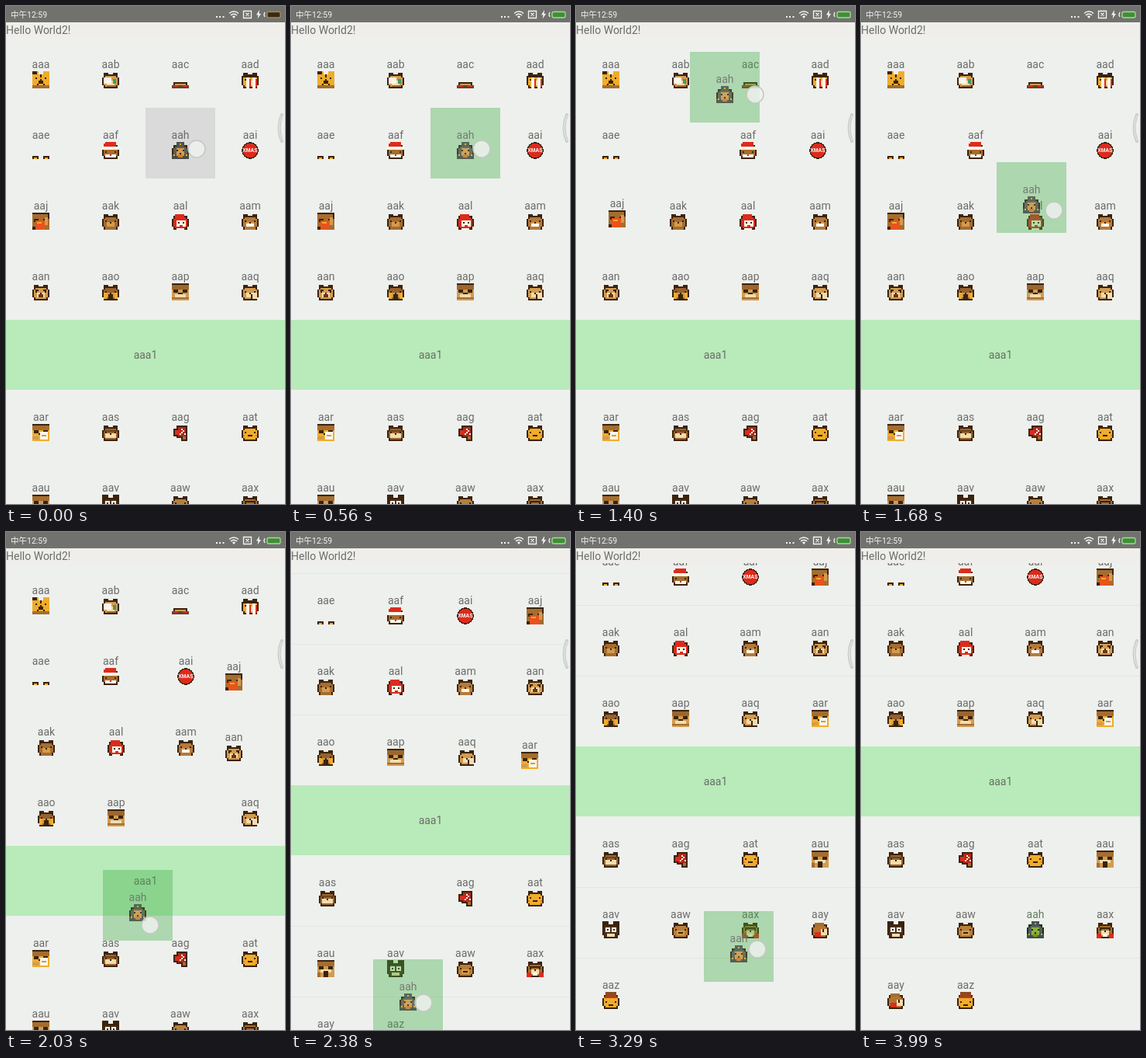
Write an HTML page that moves like this. It is 360 px wide and 641 px high and loops after 4060 ms.

```html
<!DOCTYPE html>
<html lang="en">
<head>
<meta charset="utf-8">
<title>Drag to reorder</title>
<style>
html, body { margin: 0; width: 100%; height: 100%; overflow: hidden; background: #eef0ee; }
svg { display: block; width: 100vw; height: 100vh; }
text { font: 14px Roboto, "Noto Sans", sans-serif; fill: #6c6d6a; }
.mid { text-anchor: middle; }
.clock { font: 10.5px Roboto, "Noto Sans CJK SC", sans-serif; fill: #f4f4f2; }
.xmas { font: bold 3.4px "Liberation Sans", sans-serif; fill: #fff; text-anchor: middle; }
.px { shape-rendering: crispEdges; }
.dropped text { fill: #5f7d5c; }
.dropped .px { filter: hue-rotate(45deg); }
</style>
</head>
<body>
<svg id="stage" viewBox="0 0 360 641" preserveAspectRatio="none">
  <defs>
    <clipPath id="list"><rect y="40" width="360" height="601"/></clipPath>
    <clipPath id="tile"><rect width="11" height="11"/></clipPath>
  </defs>
  <rect width="360" height="641" fill="#eef0ee"/>
  <g clip-path="url(#list)">
    <g id="page">
      <g id="lines" fill="#e3e6e3"></g>
      <rect y="404" width="360" height="90" fill="#b8ebb9"/>
      <text class="mid" x="180" y="454">aaa1</text>
      <rect id="press" x="180" y="131" width="90" height="91" fill="#000" opacity=".09"/>
      <g id="cells"></g>
    </g>
  </g>
  <rect y="21" width="360" height="19" fill="#efeeea"/>
  <text x="0" y="36">Hello World2!</text>
  <rect width="360" height="21" fill="#71716e"/>
  <text class="clock" x="6" y="15">中午12:59</text>
  <g fill="#f4f4f2">
    <path d="M271 13h2v2h-2zM275 13h2v2h-2zM279.500 13h2v2h-2zM292 13.500l2 2.500 2-2.500a3 3 0 0 0-4 0z"/>
    <path d="M327 5l-4 6.500h2.500l-1 5 4.500-6.500h-2.500z"/>
  </g>
  <g fill="none" stroke="#f4f4f2" stroke-width="1.300">
    <path d="M288 9.500a8.500 8.500 0 0 1 12 0M290 12a5.500 5.500 0 0 1 8 0"/>
    <path d="M306.500 6.500h10v9h-10zM309.500 9l4 4M313.500 9l-4 4"/>
    <path d="M334 8q-2 3 0 6"/>
  </g>
  <rect id="battery" x="337" y="7.500" width="17" height="7.500" rx="2" stroke-width="1.300"/>
  <path d="M356 140q-7 17 0 34" fill="none" stroke="#c6cac6" stroke-width="4" stroke-linecap="round"/>
  <path d="M356 141q-7 16 0 32" fill="none" stroke="#dce0dc" stroke-width="2" stroke-linecap="round"/>
  <g id="drag">
    <rect width="90" height="91" fill="#3caa42" opacity=".36"/>
    <g id="held" opacity=".85"></g>
  </g>
  <circle id="finger" r="11" fill="#f0f2ef" fill-opacity=".82" stroke="#c2c8c2" stroke-width="1.500"/>
</svg>
<script>
const LOOP = 4060, STEP = 70, PICK = 490, DROP = 3710, HELD = 'aah';
const $ = id => document.getElementById(id);
const DARK = '#3b230c', FUR = '#a56d2f', TAN = '#d29b50', CREAM = '#f1dcae',
  RED = '#dc2b1c', GOLD = '#f0ac2b', WHITE = '#fbf6ea';

// Pixel icons on an 11 x 11 grid.
const box = (x, y, w, h, c) => `<rect x="${x}" y="${y}" width="${w}" height="${h}" fill="${c}"/>`;
const dots = (c, ...at) => at.map(([x, y]) => box(x, y, 1, 1, c)).join('');
const eyes = (y = 5) => dots(DARK, [2, y], [8, y]);
const blob = c => box(1, 2, 9, 9, DARK) + box(0, 4, 11, 5, DARK) + box(2, 3, 7, 7, c) + box(1, 4, 9, 5, c);
const ears = c => box(1, 1, 3, 2, DARK) + box(7, 1, 3, 2, DARK) + dots(c, [2, 2], [8, 2]);
const bear = (c = FUR, m = CREAM) => ears(c) + blob(c) + box(3, 6, 5, 3, m) + eyes() + box(5, 6, 1, 1, DARK);
const face = (c = FUR, m = TAN) => box(0, 0, 11, 11, m) + box(0, 0, 11, 4, c) + box(0, 0, 11, 1, DARK) +
  box(1, 4, 3, 2, DARK) + box(7, 4, 3, 2, DARK) + box(4, 6, 3, 1, DARK);
const stand = (c = FUR) => bear(c, TAN) + box(2, 9, 7, 2, c) + box(1, 9, 1, 2, DARK) + box(9, 9, 1, 2, DARK);

const icons = {
  aaa: box(0, 0, 11, 11, GOLD) + box(0, 0, 3, 2, DARK) + box(5, 0, 1, 4, DARK) + box(4, 6, 3, 2, DARK) +
    box(0, 9, 11, 2, FUR) + dots(DARK, [2, 4], [8, 4], [3, 8], [7, 8], [5, 5]) + box(4, 0, 3, 2, '#eef0ee'),
  aab: bear(TAN) + box(1, 4, 5, 4, WHITE) + box(7, 5, 2, 3, '#3f9a68') + box(3, 9, 6, 1, FUR),
  aac: box(1, 7, 9, 2, DARK) + box(2, 8, 7, 1, TAN) + box(0, 9, 11, 2, '#5c4433') + box(1, 9, 3, 1, RED) + box(7, 9, 3, 1, RED),
  aad: bear(GOLD) + box(0, 3, 11, 1, DARK) + box(3, 4, 2, 7, WHITE) + box(7, 4, 2, 7, WHITE) + box(5, 5, 1, 5, RED) + box(9, 5, 1, 5, RED),
  aae: box(0, 9, 4, 2, DARK) + box(7, 9, 4, 2, DARK) + box(1, 10, 2, 1, GOLD) + box(8, 10, 2, 1, GOLD),
  aaf: blob(FUR) + box(2, 0, 7, 3, RED) + box(1, 1, 2, 3, RED) + box(0, 3, 11, 2, WHITE) + eyes(6) + box(2, 8, 7, 2, WHITE) + box(5, 8, 1, 1, RED),
  aah: blob('#586158') + box(3, 0, 5, 3, '#4b554c') + box(0, 8, 11, 3, '#454d45') + box(3, 4, 5, 5, TAN) +
    dots(DARK, [3, 5], [7, 5], [5, 7]) + box(4, 8, 3, 2, '#d87828') + dots(GOLD, [5, 1], [1, 8], [9, 8]),
  aai: `<circle cx="5.500" cy="5.500" r="5" fill="${RED}" stroke="${DARK}" stroke-width=".7"/>` + box(0, 5, 1, 1, DARK) +
    '<text class="xmas" x="5.500" y="6.700">XMAS</text>',
  aaj: face(FUR, FUR) + box(2, 5, 6, 6, '#e8531d') + box(3, 6, 3, 1, GOLD) + box(8, 3, 2, 5, TAN) + box(10, 0, 1, 4, DARK) + box(0, 9, 2, 2, DARK),
  aak: stand(),
  aal: blob(RED) + box(2, 1, 6, 2, RED) + box(3, 5, 6, 4, WHITE) + dots(DARK, [4, 6], [7, 6]) + box(5, 8, 2, 1, RED) + box(3, 10, 5, 1, WHITE),
  aam: stand('#b47a3c') + box(3, 7, 5, 2, WHITE),
  aan: bear(TAN) + box(4, 7, 3, 2, '#6d3414') + box(2, 4, 2, 1, DARK) + box(7, 4, 2, 1, DARK),
  aao: bear('#97622b', TAN) + box(1, 6, 2, 4, GOLD) + box(8, 6, 2, 4, GOLD) + box(4, 7, 3, 3, DARK),
  aap: face('#9c662d', TAN) + box(2, 7, 7, 2, CREAM) + box(0, 9, 11, 1, FUR),
  aaq: bear(TAN) + box(7, 6, 3, 4, CREAM) + box(6, 7, 1, 3, DARK),
  aar: face(FUR, GOLD) + box(5, 5, 5, 5, WHITE) + box(6, 7, 3, 1, TAN) + box(0, 8, 4, 2, TAN),
  aas: bear('#9a642f') + box(2, 6, 7, 3, CREAM) + box(5, 6, 1, 1, DARK) + box(1, 4, 9, 1, '#6f431a'),
  aag: box(3, 1, 7, 8, DARK) + box(1, 3, 9, 5, DARK) + box(4, 2, 5, 6, '#b5281a') + box(2, 4, 3, 3, RED) +
    dots(WHITE, [6, 3], [7, 4], [5, 6], [8, 6], [6, 5]) + box(6, 9, 4, 2, DARK) + box(7, 8, 2, 2, FUR),
  aat: ears(GOLD) + blob(GOLD) + eyes() + box(4, 7, 3, 1, DARK) + dots('#e8791f', [1, 7], [9, 7]),
  aau: face(FUR, TAN) + box(2, 6, 7, 2, CREAM) + box(4, 7, 3, 4, DARK) + box(0, 8, 2, 3, FUR),
  aav: box(0, 0, 4, 4, DARK) + box(7, 0, 4, 4, DARK) + blob('#4b2d18') + box(2, 4, 3, 3, WHITE) + box(6, 4, 3, 3, WHITE) +
    dots(DARK, [3, 5], [7, 5]) + box(3, 8, 5, 2, CREAM),
  aaw: ears(TAN) + blob('#b97f38') + box(3, 6, 5, 3, TAN) + eyes() + box(4, 7, 3, 1, DARK),
  aax: bear() + box(2, 4, 7, 1, DARK) + box(0, 8, 3, 3, RED) + box(8, 8, 3, 3, RED) + box(4, 8, 3, 2, WHITE),
  aay: blob('#b4732f') + box(2, 1, 6, 2, FUR) + box(6, 5, 4, 4, CREAM) + box(7, 5, 1, 2, DARK) + box(2, 7, 4, 3, RED),
  aaz: blob(GOLD) + box(2, 0, 7, 3, '#8d4a1f') + box(1, 3, 9, 1, RED) + eyes(6) + box(4, 8, 3, 1, DARK)
};
const names = 'aaa aab aac aad aae aaf aah aai aaj aak aal aam aan aao aap aaq aar aas aag aat aau aav aaw aax aay aaz'.split(' ');
const cell = n => `<text class="mid" x="45" y="40">${n}</text>` +
  `<g class="px" transform="translate(34 44) scale(2)" clip-path="url(#tile)">${icons[n]}</g>`;

const rowY = r => 40.3 + 90.8 * r;
const slot = i => [i % 4 * 90, rowY((i >> 2) + (i > 15 ? 1 : 0))];

// When the held cell claims a new slot, the others slide over.
const moves = [[934, 10], [1194, 5], [1530, 6], [1854, 14], [2170, 17], [2548, 25], [3300, 22]];
const rest = names.filter(n => n !== HELD);
const place = (n, gap) => {
  if (n === HELD) return slot(gap);
  const i = rest.indexOf(n);
  return slot(i < gap ? i : i + 1);
};

const clamp = v => Math.max(0, Math.min(1, v));
const mix = (a, b, k) => a.map((v, i) => v + (b[i] - v) * k);
const overshoot = k => { const u = clamp(k) - 1; return 1 + 1.7 * u ** 3 + 0.7 * u * u; };
const along = (keys, t) => {
  const i = keys.findIndex(k => k[0] > t);
  if (i < 0) return keys[keys.length - 1].slice(1);
  if (!i) return keys[0].slice(1);
  const a = keys[i - 1], b = keys[i];
  return mix(a.slice(1), b.slice(1), (t - a[0]) / (b[0] - a[0]));
};

const boxPath = [[700, 180, 131], [840, 184, 190], [920, 145, 218], [980, 72, 195], [1190, 88, 135], [1400, 147, 59],
  [1570, 178, 125], [1850, 170, 318], [2030, 125, 435], [2170, 100, 492], [2380, 106, 550], [2800, 116, 546],
  [3010, 118, 545], [3330, 172, 480], [3640, 181, 459]];
const touch = [[700, 66, 53], [980, 48, 46], [1400, 84, 55], [2030, 61, 71], [2380, 65, 56], [2800, 74, 40], [3500, 66, 53]];

$('cells').innerHTML = names.map(n => `<g id="${n}">${cell(n)}</g>`).join('');
$('held').innerHTML = cell(HELD);
$('lines').innerHTML = [1, 2, 3, 6, 7].map(r => box(0, Math.round(rowY(r)), 360, 1, '#e3e6e3')).join('');

const shift = (el, [x, y]) => el.setAttribute('transform', `translate(${Math.round(x)} ${Math.round(y)})`);
const show = (el, on) => el.setAttribute('visibility', on ? 'visible' : 'hidden');

function draw(t) {
  const dragging = t >= PICK && t < DROP;
  const scroll = 128 * clamp((t - 2170) / 344);
  shift($('page'), [0, -scroll]);
  show($('lines'), scroll > 0);
  show($('press'), t < PICK);
  for (const n of names) {
    let p = place(n, 6);
    for (const [at, gap] of moves) if (t > at) p = mix(p, place(n, gap), overshoot((t - at) / 400));
    shift($(n), p);
  }
  show($(HELD), !dragging);
  $(HELD).setAttribute('class', t >= DROP ? 'dropped' : '');

  const at = along(boxPath, t), off = along(touch, t);
  show($('drag'), dragging);
  shift($('drag'), at);
  show($('finger'), t < DROP);
  shift($('finger'), [at[0] + off[0], at[1] + off[1]]);
  $('battery').setAttribute('fill', t < PICK ? '#3a2a12' : '#3f8f35');
  $('battery').setAttribute('stroke', t < PICK ? '#a98a55' : '#a5d89a');
}

const start = performance.now();
function tick() {
  const t = (performance.now() - start) % LOOP;
  draw(Math.floor(t / STEP) * STEP);
  requestAnimationFrame(tick);
}
tick();
</script>
</body>
</html>
```
